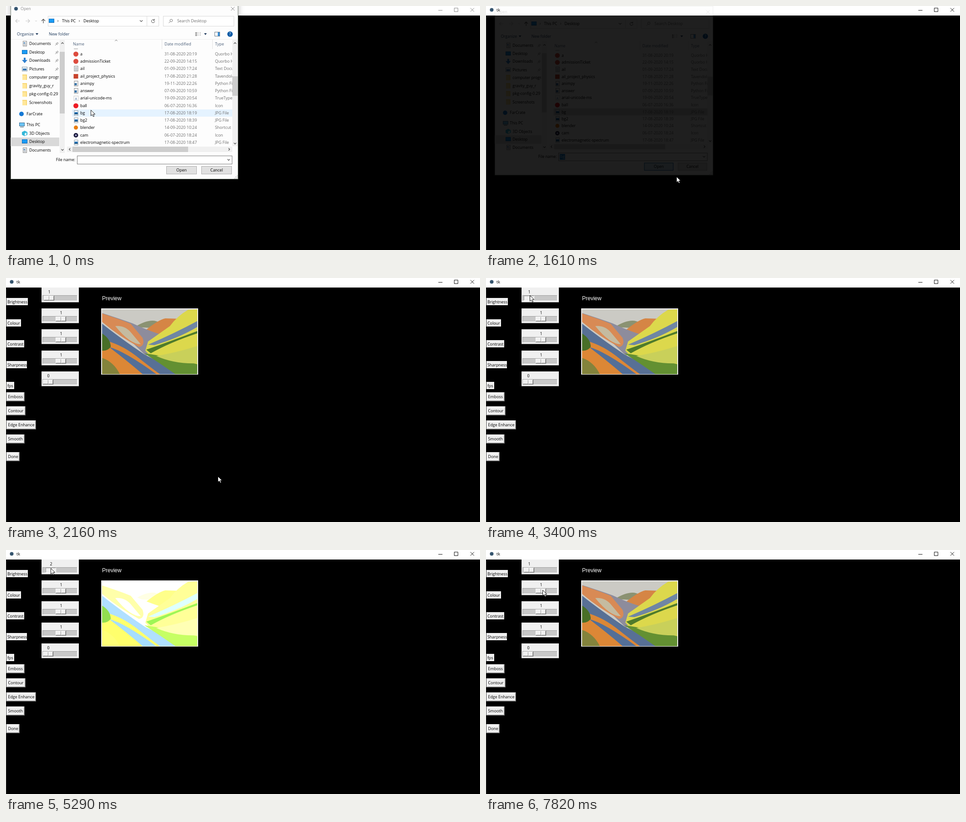
An HTML page with a canvas for the animation above (8000 ms loop, 1041 px wide and 538 px high).

```html
<!DOCTYPE html>
<html lang="en">
<head>
<meta charset="utf-8">
<title>Image editor</title>
<style>
html, body { margin: 0; width: 100%; height: 100%; overflow: hidden; background: #000; }
canvas { display: block; width: 1041px; height: 538px; }
</style>
</head>
<body>
<canvas id="stage" width="1041" height="538"></canvas>
<script>
const LOOP = 8000;
const UI = '"Open Sans", "Noto Sans", sans-serif';
const screen = document.getElementById('stage').getContext('2d');
const layer = document.createElement('canvas');
layer.width = 1041;
layer.height = 538;
let g = screen;

function fill(x, y, w, h, color) {
  g.fillStyle = color;
  g.fillRect(x, y, w, h);
}
function frame(x, y, w, h, color, edge) {
  fill(x, y, w, h, edge);
  fill(x + 1, y + 1, w - 2, h - 2, color);
}
function text(s, x, y, color = '#000', align = 'left', size = 8.9, font = UI) {
  g.font = size + 'px ' + font;
  g.textAlign = align;
  g.fillStyle = color;
  g.fillText(s, x, y + 3.2);
}
function dot(x, y, r, color) {
  g.fillStyle = color;
  g.beginPath();
  g.arc(x, y, r, 0, 7);
  g.fill();
}
function line(d, color, width = 1) {
  g.strokeStyle = color;
  g.lineWidth = width;
  g.stroke(new Path2D(d));
}
function shape(d, color) {
  g.fillStyle = color;
  g.fill(new Path2D(d));
}
// Chevron pointing along (dx, dy)
function chevron(x, y, dx, dy, color = '#444', s = 2.6, width = 1.2) {
  const bx = x - dx * s / 2, by = y - dy * s / 2;
  line(`M${bx - dy * s} ${by - dx * s}L${x + dx * s / 2} ${y + dy * s / 2}L${bx + dy * s} ${by + dx * s}`, color, width);
}
function clipped(x, y, w, h, draw) {
  g.save();
  g.beginPath();
  g.rect(x, y, w, h);
  g.clip();
  draw();
  g.restore();
}

const icons = {
  doc(x, y) {
    frame(x - 4, y - 6, 9, 12, '#f4f4f4', '#8c8c8c');
    for (let i = 0; i < 4; i++) fill(x - 2, y - 3 + i * 2, 5, 1, '#9aa3ad');
  },
  lib(x, y) {
    icons.doc(x, y);
    fill(x - 2, y - 3, 2, 3, '#3c84c4');
  },
  desk(x, y) {
    frame(x - 6, y - 5, 12, 9, '#1a9bf4', '#0b6fc0');
    fill(x - 6, y + 3, 12, 1, '#0a5ca4');
  },
  down(x, y) {
    shape(`M${x - 2} ${y - 6}h4v5h4l-6 7l-6 -7h4z`, '#2f80d0');
  },
  pic(x, y) {
    frame(x - 6, y - 5, 12, 10, '#e8f3fb', '#8c9aa6');
    fill(x - 4, y - 1, 8, 4, '#3976b0');
  },
  folder(x, y) {
    fill(x - 5, y - 6, 10, 12, '#f8d775');
    fill(x - 5, y - 4, 8, 10, '#ffe79a');
  },
  pc(x, y) {
    frame(x - 5, y - 5, 12, 8, '#6cc4f4', '#3a6f94');
    fill(x - 3, y + 4, 8, 1.5, '#5c7c90');
  },
  cube(x, y) {
    shape(`M${x} ${y - 6}l6 3v6l-6 3l-6 -3v-6z`, '#35b8d8');
    shape(`M${x} ${y}l4 -2v5l-4 2z`, '#e6f8fc');
  },
  cloud(x, y) { dot(x, y, 5, '#1478d4'); },
  web(x, y) { dot(x, y, 5.5, '#dd4b3e'); },
  slides(x, y) { fill(x - 5, y - 5, 10, 10, '#c8432c'); },
  code(x, y) {
    frame(x - 4, y - 6, 9, 12, '#f8f8f8', '#8c8c8c');
    fill(x - 3, y - 1, 5, 5, '#3a74a8');
  },
  font(x, y) {
    frame(x - 5, y - 5, 11, 11, '#fbfbfb', '#d0d0d0');
    text('A', x - 2, y + 1, '#456a9c', 'left', 7);
  },
  ball(x, y) { dot(x, y, 5.5, '#ee1c25'); },
  jpg(x, y) {
    frame(x - 4, y - 6, 9, 12, '#fbfbfb', '#8c9aa6');
    fill(x - 3, y - 2, 7, 5, '#2474b8');
    fill(x - 3, y + 1, 7, 2, '#174c74');
  },
  app(x, y) { dot(x, y, 4.5, '#e87d0d'); },
  cam(x, y) {
    dot(x, y, 5, '#1b1b3c');
    dot(x, y, 2, '#a6a6d0');
  }
};

const places = [
  ['lib', 'Documents', 83], ['desk', 'Desktop', 102], ['down', 'Downloads', 120], ['pic', 'Pictures', 139],
  ['folder', 'computer programs', 157], ['folder', 'gravity_guy_r', 176], ['folder', 'pkg-config-0.29', 194],
  ['folder', 'Screenshots', 213], ['cloud', 'FarCrate', 238], ['pc', 'This PC', 262],
  ['cube', '3D Objects', 281], ['desk', 'Desktop', 299], ['lib', 'Documents', 318]
];
const files = [
  ['web', 'a', '31-08-2020 20:19', 'Quorbo HTML'],
  ['web', 'admissionTicket', '22-09-2020 14:15', 'Quorbo HTML'],
  ['doc', 'ail', '01-09-2020 17:24', 'Text Document'],
  ['slides', 'ail_project_physics', '17-08-2020 21:28', 'Tavendole'],
  ['code', 'animpy', '19-11-2020 22:26', 'Python File'],
  ['code', 'answer', '07-09-2020 10:59', 'Python File'],
  ['font', 'arial-unicode-ms', '19-09-2020 20:54', 'TrueType'],
  ['ball', 'ball', '06-07-2020 16:36', 'Icon'],
  ['jpg', 'bg', '17-08-2020 18:19', 'JPG File'],
  ['jpg', 'bg2', '17-08-2020 18:39', 'JPG File'],
  ['app', 'blender', '14-09-2020 10:24', 'Shortcut'],
  ['cam', 'cam', '06-07-2020 18:24', 'Icon'],
  ['jpg', 'electromagnetic-spectrum', '17-08-2020 18:47', 'JPG File']
];

function pushButton(label, x, face, edge) {
  frame(x, 353, 67, 18, face, edge);
  text(label, x + 33.5, 362, '#000', 'center');
}

function sidePane() {
  fill(10, 290, 107, 19, '#d9d9d9');
  clipped(10, 75, 107, 249, () => {
    places.forEach(([icon, name, y], i) => {
      const top = i === 8 || i === 9;
      icons[icon](top ? 34 : 41, y);
      text(name, top ? 45 : 51, y);
    });
    for (let i = 0; i < 4; i++) {
      const y = places[i][2];
      line(`M108 ${y + 4}l3 -3M109 ${y - 1}l4 4M111 ${y - 1}l2 -2l2 2l-2 2z`, '#8a8a8a');
    }
  });
  fill(118, 75, 11, 249, '#f0f0f0');
  fill(118, 101, 11, 136, '#cdcdcd');
  chevron(124, 82, 0, -1);
  chevron(124, 317, 0, 1);
}

function fileList(t) {
  text('Name', 147, 84, '#4c607a');
  text('Date modified', 348, 84, '#4c607a');
  text('Type', 459, 84, '#4c607a');
  fill(342, 74, 1, 21, '#e2e2e2');
  fill(453, 74, 1, 21, '#e2e2e2');
  chevron(242, 76, 0, -1, '#666', 2.6, 1);
  fill(149, 94, 9, 1, '#9a9a9a');
  const picked = t < 410 ? '#e5f3ff' : t < 1340 ? '#cce8ff' : '#d4d4d4';
  fill(145, 228, 352, 16, picked);
  clipped(140, 94, 357, 214, () => files.forEach(([icon, name, date, type], i) => {
    const y = Math.round(106 + i * 16.23);
    icons[icon](153.5, y);
    text(name, 163, y);
    text(date, 348, y, '#6d6d6d');
    text(type, 459, y, '#6d6d6d');
  }));
  fill(497, 75, 12, 234, '#f0f0f0');
  fill(497, 155, 12, 43, '#cdcdcd');
  chevron(503, 82, 0, -1);
  chevron(503, 303, 0, 1);
  fill(134, 310, 363, 12, '#f0f0f0');
  fill(146, 310, 254, 12, '#cdcdcd');
  chevron(140, 316, -1, 0);
  chevron(490, 316, 1, 0);
}

function dialog(t) {
  frame(10, -8, 500, 390, '#fdfdfd', '#7b857b');
  const closing = t >= 1460;
  if (!closing) dot(22, 6, 4, '#35546e');
  text('Open', closing ? 16 : 32, 6, t < 410 ? '#888' : '#000');
  line('M494 2l8 8M502 2l-8 8', t < 410 ? '#888' : '#333');

  line('M30 33h-9m4 -4l-4 4l4 4M43 33h9m-4 -4l4 4l-4 4', '#c8c8c8', 1.2);
  chevron(66, 33, 0, 1, '#bbb', 1.6, 1);
  line('M82 38v-9m-4 4l4 -4l4 4', '#555', 1.3);
  frame(92, 22, 244, 23, '#fff', '#d9d9d9');
  fill(309, 23, 1, 21, '#d9d9d9');
  icons.desk(100, 33);
  chevron(114, 33, 1, 0, '#555', 2, 1);
  text('This PC', 123, 33);
  chevron(161, 33, 1, 0, '#555', 2, 1);
  text('Desktop', 170, 33);
  chevron(297, 33, 0, 1, '#555', 3);
  line('M325.5 31a3.5 3.5 0 1 0 1 2.5M326 28.5v3h-3', '#444');
  frame(345, 22, 156, 23, '#fff', '#d9d9d9');
  line('M360.5 34.5l-3 3M360 32a2.8 2.8 0 1 1 5.6 0a2.8 2.8 0 1 1 -5.6 0', '#777');
  text('Search Desktop', 376, 33, '#6d6d6d');

  text('Organize', 24, 62, '#1e395b');
  shape('M65 60h6l-3 4z', '#1e395b');
  text('New folder', 94, 62, '#1e395b');
  for (let i = 0; i < 3; i++) {
    fill(416, 58 + i * 3, 3, 2, '#777');
    fill(420, 58 + i * 3, 3, 1, '#aaa');
    fill(425, 58 + i * 3, 3, 1, '#aaa');
  }
  shape('M435 60h6l-3 4z', '#1e395b');
  frame(458, 57, 12, 10, '#fff', '#6a7885');
  fill(465, 58, 4, 8, '#3a90d8');
  dot(492, 62, 6, '#0b5aa5');
  text('?', 492, 62, '#fff', 'center', 9, 'bold 9px ' + UI);
  fill(11, 73, 498, 1, '#ededed');

  sidePane();
  fileList(t);

  text('File name:', 152, 339, '#000', 'right');
  frame(156, 330, 341, 19, '#fff', '#7a7a7a');
  if (t >= 410) {
    if (t >= 1340) fill(159, 333, 12, 13, '#0078d7');
    text('bg', 160, 339, t >= 1340 ? '#fff' : '#000');
  }
  chevron(489, 339, 0, 1);
  const face = t < 1220 ? '#e1e1e1' : t < 1340 ? '#e5f1fb' : '#cce4f7';
  pushButton('Open', 352, face, t < 410 ? '#adadad' : t < 1340 ? '#0078d7' : '#005499');
  pushButton('Cancel', 429, '#e1e1e1', '#adadad');
  for (let i = 0; i < 3; i++)
    for (let j = 0; j <= i; j++) fill(507 - j * 3, 373 + i * 3, 1.5, 1.5, '#aaa');
}

function titleBar(active) {
  fill(0, 0, 1041, 538, '#000');
  fill(0, 21, 1, 517, '#343434');
  fill(0, 0, 1041, 21, '#fff');
  line('M949.5 9.5h9M984.5 4.5h8v8h-8zM1020 4.5l8 8M1028 4.5l-8 8', active ? '#111' : '#888');
  if (!active) return;
  dot(12.5, 8.5, 4, '#35546e');
  text('tk', 23, 9);
}

// Raised or sunken bevel
function bevel(x, y, w, h, up = true) {
  fill(x, y, w, h, up ? '#6b6b6b' : '#fff');
  fill(x, y, w - 1, h - 1, up ? '#fff' : '#a0a0a0');
  fill(x + 1, y + 1, w - 2, h - 2, up ? '#a8a8a8' : '#e4e4e4');
  fill(x + 1, y + 1, w - 3, h - 3, '#f0f0f0');
}

function slider(y, value, thumb, held) {
  fill(78, y, 82, 32.5, '#f0f0f0');
  text(value, thumb + 12, y + 10, '#000', 'center');
  fill(80, y + 17, 77, 13, '#fff');
  fill(80, y + 17, 76, 12, '#a0a0a0');
  fill(81, y + 18, 75, 11, '#c8c8c8');
  bevel(thumb, y + 18, 23, 11, !held);
  fill(thumb + 11, y + 19, 1, 9, held ? '#fff' : '#909090');
  fill(thumb + 12, y + 19, 1, 9, held ? '#d8d8d8' : '#fff');
}

function picture(k) {
  const paint = (color, d) => {
    const rgb = [1, 3, 5].map(i => Math.min(255, parseInt(color.substr(i, 2), 16) * k));
    shape(d, `rgb(${rgb})`);
  };
  fill(209, 67, 213, 146, '#f0f0f0');
  clipped(211, 69, 209, 143, () => {
    paint('#cbcac4', 'M210 69h210v143h-210z');
    paint('#8b9272', 'M283 108Q305 94 322 94Q338 94 352 112z');
    paint('#d58545', 'M308 114Q335 92 350 89L386 90L345 132z');
    paint('#8d8c9c', 'M210 77Q250 90 278 100Q310 115 338 124L308 172Z L210 160z');
    paint('#d88a55', 'M210 78Q250 91 274 101L300 132Q306 150 292 152Q250 130 210 96z');
    paint('#c5bba0', 'M240 106Q262 104 276 122L296 146Q272 146 240 106z');
    paint('#dcd84c', 'M420 69L400 70Q376 84 360 106L312 140L306 160L330 186L420 196z');
    paint('#6f86a4', 'M420 95Q370 122 312 147L326 148Q380 132 420 108z');
    paint('#4f7b2b', 'M420 117Q360 140 308 158L318 166Q360 142 420 122z');
    paint('#587095', 'M210 100Q250 132 306 170Q350 190 378 212H300Q260 172 210 150z');
    paint('#639032', 'M304 166Q350 172 420 190V212H372Q338 188 304 166z');
    paint('#c9d05a', 'M330 172Q376 164 420 150V188Q370 190 330 172z');
    paint('#dc8736', 'M210 136Q250 144 286 172Q316 196 338 212H210z');
    paint('#536f98', 'M226 152Q262 162 330 212H300Q268 184 226 152z');
    paint('#496f28', 'M210 122Q230 134 230 152Q222 162 210 160z');
    paint('#83833c', 'M210 176Q236 184 250 212H210z');
  });
}

const sliders = [['1', 67, 109], ['1', 113, 109], ['1', 160, 109], ['0', 206, 81]];
const labels = [['Brightness', 44, 47], ['Colour', 91, 32], ['Contrast', 137, 39], ['Sharpness', 183, 45], ['fps', 229, 17]];
const buttons = [['Emboss', 252, 40], ['Contour', 283, 42], ['Edge Enhance', 314, 65], ['Smooth', 345, 40], ['Done', 384, 29]];

// Value of the latest [time, value] step
const at = (steps, t) => steps.reduce((v, s) => t >= s[0] ? s[1] : v, steps[0][1]);
const level = [[0, 1], [3960, 2], [4080, 3], [5170, 2], [6690, 1]];
const shown = [[0, 1], [4080, 2], [4210, 3], [5290, 2], [6840, 1]];

function editor(t) {
  for (const [s, y, w] of labels) {
    fill(1, y, w, 16, '#f0f0f0');
    text(s, 3, y + 8.5);
  }
  for (const [s, y, w] of buttons) {
    bevel(1, y, w, 20);
    text(s, 4.5, y + 10);
  }
  const v = at(level, t);
  slider(21, v, [83, 87, 89][v - 1], t >= 3400 && t < 7270);
  sliders.forEach(([value, y, thumb]) => slider(y, value, thumb));
  text('Preview', 211, 45.3, '#fff', 'left', 12, '"Liberation Sans", Arial, sans-serif');
  picture(at(shown, t));
}

const path = [
  [0, [186, 229]], [680, [451, 445]], [830, [459, 438]], [950, [436, 412]], [1070, [402, 377]],
  [1220, [397, 368]], [1340, [393, 360]], [1610, [418, 376]], [1730, [540, 467]], [2160, [465, 437]],
  [2310, [249, 202]], [2470, [178, 117]], [2610, [150, 98]], [2730, [120, 78]], [2850, [104, 64]],
  [2970, [96, 55]], [3120, [95, 38]], [3400, [96, 38]], [3670, [96, 39]], [3960, [98, 39]],
  [4080, [100, 40]], [4210, [102, 41]], [5030, [100, 41]], [5170, [98, 40]], [6530, [97, 40]],
  [6690, [95, 39]], [7270, [111, 48]], [7420, [122, 78]], [7540, [130, 92]], [7690, [127, 91]], [7820, [124, 88]]
];

function pointer([x, y]) {
  const d = `M${x + 0.5} ${y + 0.5}v12.5l3 -2.7l2.2 4.7l2 -1l-2 -4.4h4z`;
  shape(d, '#fff');
  line(d, '#000', 0.9);
}

function render(t) {
  titleBar(t >= 1610);
  if (t < 1610) {
    g.save();
    g.shadowColor = t < 410 ? 'rgba(0,0,0,.3)' : 'rgba(0,0,0,.4)';
    g.shadowBlur = 12;
    fill(10, -8, 500, 389, '#fff');
    g.restore();
    dialog(t);
  } else if (t < 1730) {
    g = layer.getContext('2d');
    g.clearRect(0, 0, 1041, 538);
    g.save();
    g.translate(9.4, 7.4);
    g.scale(0.96, 0.958);
    dialog(t);
    g.restore();
    g = screen;
    g.globalAlpha = 0.12;
    g.drawImage(layer, 0, 0);
    g.globalAlpha = 1;
  } else if (t >= 2030) {
    editor(t);
  }
  pointer(at(path, t));
}

const start = performance.now();
function tick() {
  render((performance.now() - start) % LOOP);
  requestAnimationFrame(tick);
}
tick();
</script>
</body>
</html>
```
